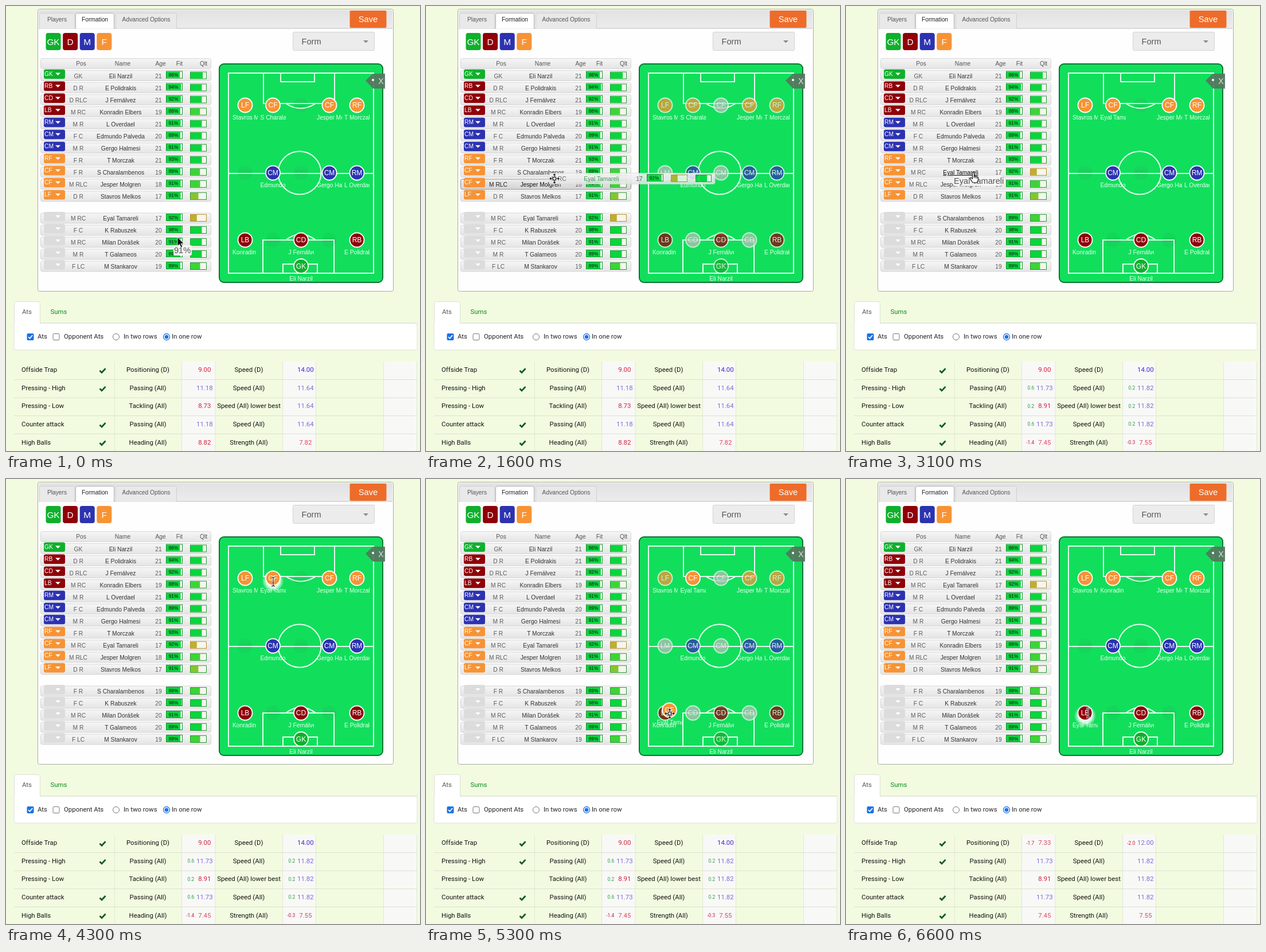
An HTML page that plays this animation: 722x776 px, repeating every 8 s.

```html
<!DOCTYPE html>
<html lang="en">
<head>
<meta charset="utf-8">
<title>Formation editor</title>
<style>
html, body { margin: 0; width: 100%; height: 100%; overflow: hidden; background: #f2fbe0; }
#stage { display: block; position: absolute; left: 0; top: 0; width: 722px; height: 776px;
  font: 10.25px "Liberation Sans", Arial, sans-serif; }
.rob { font: 11.4px Roboto, sans-serif; }
.lab { width: 44px; height: 15px; line-height: 15px; overflow: hidden; white-space: nowrap;
  text-align: center; color: #e9fff0; }
text { white-space: pre; }
</style>
</head>
<body>
<svg id="stage" viewBox="0 0 722 776" xmlns="http://www.w3.org/2000/svg">
  <defs>
    <linearGradient id="row" x2="0" y2="1"><stop stop-color="#f6f6f6"/><stop offset=".5" stop-color="#ededed"/><stop offset="1" stop-color="#e4e4e4"/></linearGradient>
    <linearGradient id="hot" x2="0" y2="1"><stop stop-color="#eee"/><stop offset="1" stop-color="#d2d2d2"/></linearGradient>
    <linearGradient id="head" x2="0" y2="1"><stop stop-color="#e2e2e2"/><stop offset="1" stop-color="#ececec"/></linearGradient>
    <radialGradient id="glow"><stop offset=".6" stop-color="#fff" stop-opacity=".85"/><stop offset="1" stop-color="#fff" stop-opacity="0"/></radialGradient>
  </defs>
  <g id="base"></g>
  <g id="list"></g>
  <g id="pitch"></g>
  <g id="sums" class="rob"></g>
  <g id="over"></g>
</svg>
<script>
const $ = id => document.getElementById(id);
const LOOP = 8000, STEP = 100;
const COLOR = { G: '#0fb02c', D: '#8f0008', M: '#2c32b0', F: '#f79334' };

// pos | name | age | fit | quality
const players = `GK|Eli Narzil|21|86|.78
D R|E Polidrakis|21|94|.72
D RLC|J Fernálvez|21|92|.72
M RC|Konradin Elbers|19|88|.6
M R|L Overdael|21|91|.72
F C|Edmundo Palveda|20|89|.72
M R|Gergo Halmesi|21|91|.72
F R|T Morczak|21|93|.72
F R|S Charalambenos|19|89|.6
M RLC|Jesper Molgren|18|91|.61
D R|Stavros Melkos|17|91|.5
M RC|Eyal Tamareli|17|92|.4
F C|K Rabuszek|20|98|.72
M RC|Milan Dorášek|20|91|.72
M R|T Galameos|20|89|.72
F LC|M Stankarov|19|89|.61`.split('\n').map(l => l.split('|'));
const GUEST = 11;
const roles = 'GK RB CD LB RM CM CM RF CF CF LF'.split(' ');

// pitch lines: y, roles by column, list row of each (-1 = empty)
const cols = [417, 465.5, 514.5, 564, 612];
const lines = [
  [173, 'LF CF CF CF RF', [10, 8, -1, 9, 7]],
  [291, 'LM CM CM CM RM', [-1, 5, -1, 6, 4]],
  [408, 'LB CD CD CD RB', [3, -1, 2, -1, 1]]
];
const spots = lines.flatMap(([y, names, rows]) =>
  names.split(' ').map((role, i) => ({ role, x: cols[i], y, row: rows[i] })));
spots.push({ role: 'GK', x: 514.5, y: 453.5, row: 0 });

// label, tick, then skill and "delta value" per stage, twice
const table = [
  ['Offside Trap', 1, 'Positioning (D)', ['9.00', '9.00', '-1.7 7.33'], 'Speed (D)', ['14.00', '14.00', '-2.0 12.00']],
  ['Pressing - High', 1, 'Passing (All)', ['11.18', '0.6 11.73', '11.73'], 'Speed (All)', ['11.64', '0.2 11.82', '11.82']],
  ['Pressing - Low', 0, 'Tackling (All)', ['8.73', '0.2 8.91', '8.91'], 'Speed (All) lower best', ['11.64', '0.2 11.82', '11.82']],
  ['Counter attack', 1, 'Passing (All)', ['11.18', '0.6 11.73', '11.73'], 'Speed (All)', ['11.64', '0.2 11.82', '11.82']],
  ['High Balls', 1, 'Heading (All)', ['8.82', '-1.4 7.45', '7.45'], 'Strength (All)', ['7.82', '-0.3 7.55', '7.55']]
];

// pointer: time, x, y
const path = [
  [0, 299, 403], [900, 249, 371], [1100, 249, 371], [1600, 224, 301], [1900, 222, 294],
  [3300, 222, 294], [3900, 490, 210], [4200, 466, 179], [4400, 466, 179],
  [5300, 425, 409], [5500, 422, 408], [LOOP, 422, 408]
];
const shapes = [[0, 'arrow'], [1200, 'move'], [2800, 'hand'], [3500, 'arrow'], [4200, 'beam'], [4500, 'move'], [6400, 'beam']];

const box = (x, y, w, h, fill, more = '') => `<rect x="${x}" y="${y}" width="${w}" height="${h}" fill="${fill}" ${more}/>`;
const line = (d, stroke, w = 1, more = '') => `<path d="${d}" fill="none" stroke="${stroke}" stroke-width="${w}" ${more}/>`;
const text = (x, y, s, fill, anchor = 'middle', size = 0, more = '') =>
  `<text x="${x}" y="${y}" fill="${fill}" text-anchor="${anchor}" ${size ? `style="font-size:${size}px"` : ''} ${more}>${s}</text>`;
const group = (x, y, s, more = '') => `<g transform="translate(${x} ${y})" ${more}>${s}</g>`;
const rowY = i => i < 11 ? 121.5 + 21.04 * i : 370 + 21 * (i - 11);
const sumY = i => 638.3 + 31.55 * i;
const tone = role => COLOR[{ K: 'G', B: 'D', D: 'D', M: 'M', F: 'F' }[role[1]]];

function drawBase() {
  let s = box(55.5, 5.5, 620, 492, '#fefefe', 'stroke="#a8aca2" rx="3"');
  s += box(57, 7, 617, 32, 'url(#head)', 'rx="2"') + line('M57 39H674', '#bdbdbd');
  [[58.5, 61, 'Players'], [121.5, 67, 'Formation'], [191.5, 106, 'Advanced Options']].forEach(([x, w, name], i) => {
    const on = i == 1;
    s += line(`M${x} 39.5V15.5q0-3 3-3h${w - 6}q3 0 3 3v24`, on ? '#aaa' : '#d0d0d0', 1, `style="fill:${on ? '#fff' : '#e9e9e9'}"`);
    s += text(x + w / 2, 27, name, on ? '#212121' : '#555');
  });
  s += box(599.5, 8, 64, 30, '#ee6c2a', 'rx="2"') + text(631.5, 28, 'Save', '#fff', 'middle', 14.6);
  ['GK', 'D', 'M', 'F'].forEach((name, i) => {
    const x = 69.5 + 29.6 * i;
    s += box(x, 47, 26, 30, COLOR[name[0]], 'rx="4"') + text(x + 13, 67.5, name, '#fff', 'middle', 15.4);
  });
  s += box(500.5, 45.5, 142, 32, '#ececec', 'rx="2" stroke="#d2d2d2"');
  s += text(515.5, 67, 'Form', '#555', 'start', 14.6) + '<path d="M623 60h9l-4.500 4.500z" fill="#888"/>';
  s += box(60.5, 91.5, 297, 18, 'url(#row)', 'stroke="#d8d8d8" rx="3"');
  [[131, 'Pos'], [203.5, 'Name'], [269.5, 'Age'], [302.5, 'Fit'], [344.5, 'Qlt']].forEach(([x, h]) => s += text(x, 104, h, '#555'));

  s += box(372, 101, 285, 381, '#11df5c', 'rx="8" stroke="#0d7436" stroke-width="2"');
  s += line('M388 117H641V466H388ZM388 292H641M449 117V170H573V117M479 117V132H538V117M448 466V408H572V466M483 466V450H543V466' +
    'M488 170Q514 187 540 170M488 408Q514 388 540 408', '#e8fff0', 2);
  s += '<circle cx="512" cy="291" r="37.500" fill="none" stroke="#e8fff0" stroke-width="2"/>';
  s += '<path d="M627 130L640 118H661V144H640Z" fill="#55775f" opacity=".93"/><circle cx="640" cy="129" r="2" fill="#fff"/>';
  s += text(654, 136, 'X', '#e4e4e4', 'middle', 14);

  s += box(14, 553, 703, 47, '#fff', 'rx="3" stroke="#dfe3d6"');
  s += line('M60 553H717', '#dcdfd4') + line('M14.5 554V518.500q0-3 3-3H56.500q3 0 3 3V554', '#dcdfd4', 1, 'style="fill:#fff"');
  let b = text(36.5, 537, 'Ats', '#555') + text(92, 537, 'Sums', '#0b8a1c');
  s += box(36.5, 571, 12, 12, '#1a73e8', 'rx="2"') + line('M39 577l2.500 2.700l4.700-5.700', '#fff', 1.7);
  s += box(82, 571.5, 11, 11, '#fff', 'rx="2" stroke="#767676"');
  s += '<circle cx="192" cy="577" r="5.500" fill="#fff" stroke="#767676"/><circle cx="280" cy="577" r="5.500" fill="#fff" stroke="#1a73e8" stroke-width="1.300"/><circle cx="280" cy="577" r="3.300" fill="#1a73e8"/>';
  [[55, 'Ats'], [101, 'Opponent Ats'], [205, 'In two rows'], [289, 'In one row']].forEach(([x, n]) => b += text(x, 580, n, '#222', 'start'));

  [306.5, 482.5, 658.5].forEach(x => s += box(x, 620, 58.5, 156, '#f8f9f6'));
  [189.5, 306.5, 365, 482.5, 540.5, 658.5, 716.5].forEach(x => s += line(`M${x} 620V776`, '#e2e8d4'));
  table.forEach(([name, tick, a, , c], i) => {
    const y = sumY(i);
    if (i) s += line(`M14 ${y - 18.3}H717`, '#dbe0d0');
    b += text(27, y, name, '#111', 'start') + text(247.5, y, a, '#111') + text(423.5, y, c, '#111');
    if (tick) s += line(`M163.500 ${y - 2.5}l3.500 3.500l6.500-7`, '#0b5a24', 2.8);
  });
  $('base').innerHTML = s + `<g class="rob">${b}</g>`;
}

function bars(x, y, [, , , fit, q]) {
  const hue = q > .7 ? '#07d63c' : q > .55 ? '#3bd535' : q > .45 ? '#86c62c' : '#bfae30';
  const rim = q > .45 ? '#2a9836' : '#b8902c';
  return box(x + .5, y - 7.5, 28, 12, '#fff', 'stroke="#1d8f31"') + box(x + 1, y - 7, 27 * fit / 100, 11, '#07d63c') +
    text(x + 13, y + 1.5, fit + '%', '#111', 'middle', 8.2) +
    box(x + 42.5, y - 6.5, 28, 12, '#f6f6ee', `stroke="${rim}"`) + box(x + 43, y - 6, 27 * q, 11, hue);
}

function drawList(order, hot, linked) {
  $('list').innerHTML = order.map((id, i) => {
    const p = players[id], y = rowY(i), role = roles[i], on = hot == i;
    return box(60.5, y - 9, 297, 18, `url(#${on ? 'hot' : 'row'})`, `stroke="${on ? '#8f8f8f' : '#d6d6d6'}" rx="3"`) +
      box(66, y - 11, 37, 16.5, role ? tone(role) : '#dcdcdc', 'rx="3"') +
      (role ? text(67, y + .5, role, '#fff', 'start') : '') +
      `<path d="M86 ${y - 5}h9l-4.500 4.500z" fill="#fff"/>` +
      text(126, y + 4, p[0], on ? '#222' : '#5c5c5c') +
      text(200, y + 4, p[1], on || linked == i ? '#111' : '#333', 'middle', 0, linked == i ? 'text-decoration="underline"' : '') +
      text(266, y + 4, p[2], '#5c5c5c') + bars(279, y, p);
  }).join('');
}

const label = (x, y, name) => `<foreignObject x="${x - 22}" y="${y + 14}" width="44" height="15"><div class="lab" xmlns="http://www.w3.org/1999/xhtml">${name}</div></foreignObject>`;
const disc = (x, y, role, fill) => `<circle cx="${x}" cy="${y}" r="12.500" fill="${fill}" stroke="#fff" stroke-width="1.800"/>` +
  text(x, y + 4.4, role, '#fff', 'middle', 12);

function drawPitch(order, drag, lit, glow) {
  $('pitch').innerHTML = spots.map(({ role, x, y, row }) => {
    if (row < 0) return drag
      ? `<g opacity=".72">${disc(x, y, role, '#bcbcbc')}</g>`
      : `<g opacity=".07"><circle cx="${x}" cy="${y}" r="13" fill="#4a5a50"/>${text(x, y + 4.4, role, '#000', 'middle', 12)}</g>`;
    const dim = drag && row != lit;
    return (glow == row ? `<circle cx="${x}" cy="${y + 5}" r="19" fill="url(#glow)"/>` : '') +
      `<g opacity="${dim ? .75 : 1}">${disc(x, y, role, tone(role))}</g>` + label(x, y, players[order[row]][1]);
  }).join('');
}

function drawSums(stage) {
  const ink = v => v < 8.2 ? '#e2445c' : v < 10 ? '#d2203e' : v > 13 ? '#4424cc' : '#8068dc';
  $('sums').innerHTML = table.map((r, i) => [[r[3], 346.3], [r[5], 522.3]].map(([vals, x]) => {
    const y = sumY(i), [v, d] = vals[stage].split(' ').reverse();
    return text(x, y, v, ink(+v)) +
      (d ? text(x - 18, y - .8, d, d < 0 ? '#c41c3c' : '#2a9c48', 'end', 8.5) : '');
  }).join('')).join('');
}

const cursor = {
  arrow: '<path d="M0 0V15.500L3.600 12.300L6.200 18.300L8.800 17.200L6.200 11.400H11Z" fill="#111" stroke="#fff" stroke-width=".8"/>',
  move: '<path d="M0-9.500L3.500-5.500H1V-1H5.500V-3.500L9.500 0L5.500 3.500V1H1V5.500H3.500L0 9.500L-3.500 5.500H-1V1H-5.500V3.500L-9.500 0L-5.500-3.500V-1H-1V-5.500H-3.500Z" fill="#222" stroke="#fff" stroke-width=".8"/><rect x="-2.500" y="-2.500" width="5" height="5" fill="#ddd" stroke="#222"/>',
  hand: '<path d="M-1.500-3.500q1.500-1.500 3 0V3q1.500-1 2.500.5q1.500-1 2.500.5q2-.5 2 1.500v4.500L6.500 14H-1L-5.500 7q0-2 2-1.500L-1.500 7Z" fill="#fff" stroke="#111" stroke-width="1.200"/><path d="M1.500 3v3M4 4v2.500M6.500 5v2" stroke="#111"/>',
  beam: [['#fff', 2.8], ['#222', 1.2]].map(([ink, w]) => line('M-3-8q3 0 3 2q0-2 3-2M0-6V6M-3 8q3 0 3-2q0 2 3 2M-1.500 2H1.500', ink, w)).join('')
};

function pointer(t) {
  const i = Math.max(1, path.findIndex(p => p[0] >= t));
  const [t0, x0, y0] = path[i - 1], [t1, x1, y1] = path[i];
  const k = (t - t0) / (t1 - t0);
  return [x0 + (x1 - x0) * k, y0 + (y1 - y0) * k];
}

function dragRow(x, y) {
  const p = players[GUEST];
  return group(x, y, box(-9, -9.5, 289, 19, 'url(#row)', 'rx="3" stroke="#d8d8d8"') +
    text(7.5, 3.5, p[0], '#555') + text(82, 3.5, p[1], '#2c9448') + text(148, 3.5, p[2], '#555') +
    bars(161, 0, p) + box(246.5, -6.5, 27, 12, '#fff', 'stroke="#2a9836"') + box(247, -6, 19, 11, '#07d63c'), 'opacity=".87"');
}

const tip = (x, y, w, s, alpha) => alpha <= 0 ? '' :
  `<g opacity="${Math.min(1, alpha)}">${box(x - 1, y - 14, w, 18, '#f6f6f6', 'rx="2" opacity=".93"')}${text(x, y, s, '#555', 'start', 14.6)}</g>`;

const swap = (a, i, j) => { const b = [...a]; [b[i], b[j]] = [b[j], b[i]]; return b; };
const start = players.map((_, i) => i);
const first = swap(start, 8, GUEST);
const orders = [start, first, swap(first, 3, 8)];

const seen = {};
function update(part, draw, ...args) {
  const key = args.join();
  if (seen[part] === key) return;
  seen[part] = key;
  draw(...args);
}

function render(t) {
  const [x, y] = pointer(t);
  const stage = t < 2800 ? 0 : t < 6400 ? 1 : 2, order = orders[stage];
  const rowDrag = t >= 1200 && t < 2800, discDrag = t >= 4500 && t < 6400;
  const near = start.reduce((a, i) => Math.abs(rowY(i) - y) < Math.abs(rowY(a) - y) ? i : a, 0);
  const shape = shapes.filter(s => s[0] <= t).pop()[1];
  const glow = t >= 4200 && t < 4500 ? 8 : t >= 6400 ? 3 : -1;

  update('list', drawList, order, rowDrag ? near : -1, t >= 2800 && t < 3500 ? 8 : -1);
  update('pitch', drawPitch, order, rowDrag || discDrag, discDrag ? 8 : -1, glow);
  update('sums', drawSums, stage);

  let s = '';
  if (rowDrag) s += dragRow(x, y);
  if (discDrag) s += disc(x - .5, y - 6, 'CF', COLOR.F) + label(x - .5, y - 6, players[GUEST][1]);
  s += tip(293, 431, 32, '91%', 1 - t / 300);
  if (t >= 2800) s += tip(188, 310, 84, players[GUEST][1], t < 3300 ? (t - 2800) / 300 : 1 - (t - 3300) / 300);
  $('over').innerHTML = s + group(x, y, cursor[shape]);
}

drawBase();
const begin = performance.now();
let last = -1;
function tick() {
  const t = Math.floor((performance.now() - begin) % LOOP / STEP) * STEP;
  if (t !== last) render(last = t);
  requestAnimationFrame(tick);
}
tick();
</script>
</body>
</html>
```
